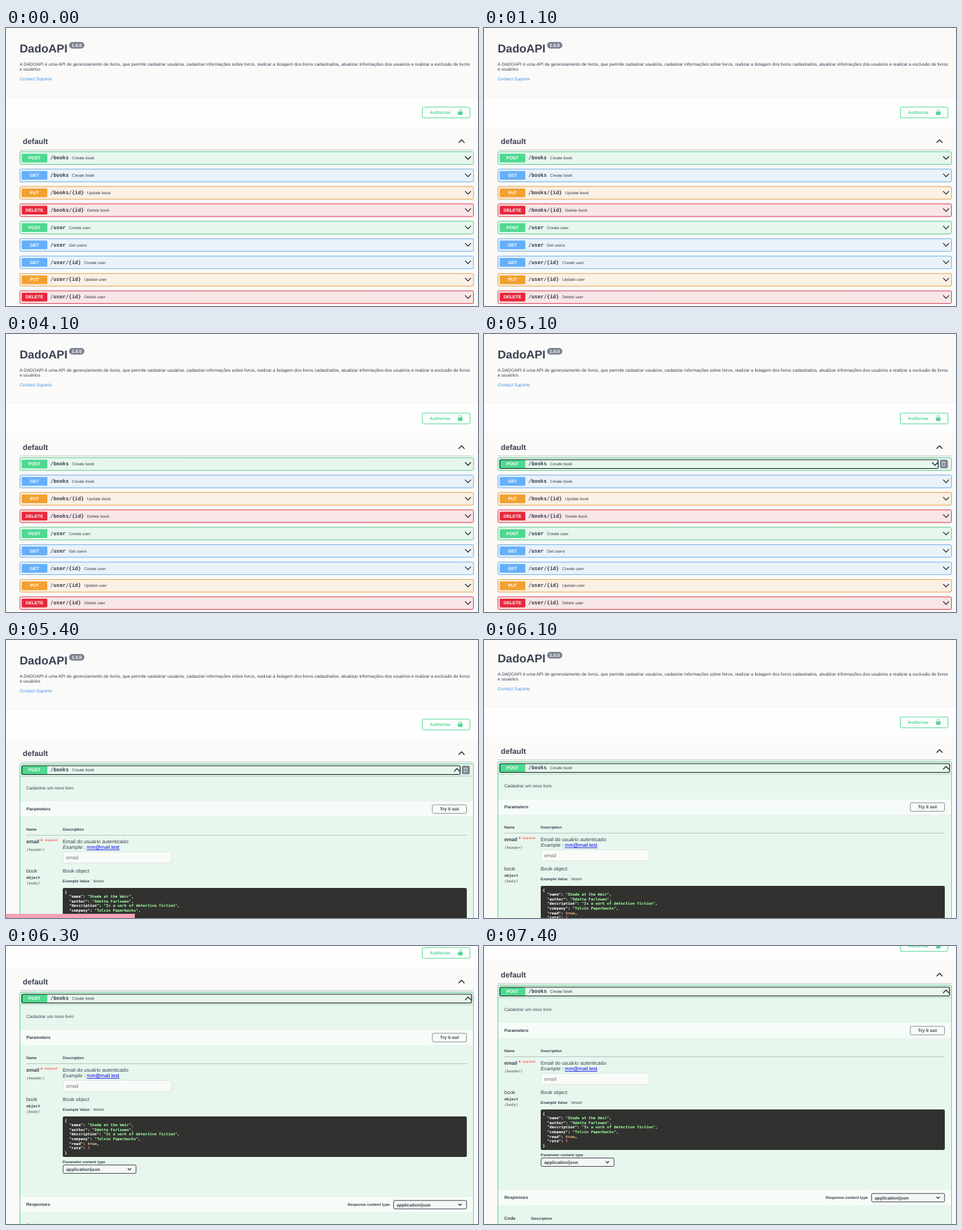
An HTML page that plays this animation: 674 px wide and 398 px high, repeating every 8 s.

```html
<!DOCTYPE html>
<html lang="pt">
<head>
<meta charset="utf-8">
<title>API docs</title>
<style>
  html, body { margin: 0; width: 100%; height: 100%; overflow: hidden; background: #fafaf9; }
  svg { display: block; }
  text { font-family: "Liberation Sans", Arial, sans-serif; fill: #3b4151; white-space: pre; text-rendering: geometricPrecision; }
  .b { font-weight: 700; }
  .i { font-style: italic; }
  .m { font-family: "DejaVu Sans Mono", monospace; font-weight: 700; }
  .block { filter: drop-shadow(0 0 .6px rgba(0, 0, 0, .3)); }
  .band { filter: drop-shadow(0 .5px .5px rgba(0, 0, 0, .14)); }
</style>
</head>
<body>
<svg id="stage" width="674" height="398" viewBox="0 0 674 398"></svg>
<script>
const SCALE = 0.4555;          // page zoom: CSS px to stage px
const LOOP = 8000, TICK = 100;
const INK = '#3b4151', GREEN = '#4fd990';
const METHODS = {
  POST: [GREEN, '#e7f7ed'],
  GET: ['#64affa', '#eaf2f9'],
  PUT: ['#f2a030', '#faf0e4'],
  DELETE: ['#e6283c', '#f8e6e6'],
};
const ROWS = [
  ['POST', '/books', 'Create book'],
  ['GET', '/books', 'Create book'],
  ['PUT', '/books/{id}', 'Update book'],
  ['DELETE', '/books/{id}', 'Delete book'],
  ['POST', '/user', 'Create user'],
  ['GET', '/user', 'Get users'],
  ['GET', '/user/{id}', 'Create user'],
  ['PUT', '/user/{id}', 'Update user'],
  ['DELETE', '/user/{id}', 'Delete user'],
];
const BOOK = [
  ['name', '"Shade at the Weir"'],
  ['author', '"Odetta Farlowen"'],
  ['description', '"Is a work of detective fiction"'],
  ['company', '"Tolvin Paperbacks"'],
  ['read', 'true'],
  ['rate', '5'],
];
// time in ms, scroll offset in stage px
const SCROLL = [[6000, 0], [6100, 3], [6200, 56], [6300, 111], [6400, 117], [6600, 120], [6800, 121]];

function add(parent, tag, attrs = {}, content) {
  const node = document.createElementNS('http://www.w3.org/2000/svg', tag);
  for (const key in attrs) node.setAttribute(key, attrs[key]);
  if (content) node.textContent = content;
  return parent.appendChild(node);
}
const group = (parent) => add(parent, 'g');
const rect = (parent, x, y, right, bottom, attrs) =>
  add(parent, 'rect', { x, y, width: right - x, height: bottom - y, ...attrs });
function text(parent, x, y, str, size, cls = '', fill = INK, anchor = 'start') {
  return add(parent, 'text', {
    x, y, class: cls, 'text-anchor': anchor,
    style: `font-size:${(size * SCALE).toFixed(3)}px;fill:${fill}`,
  }, str);
}
const rule = (parent, x, right, y, color) => rect(parent, x, y - .3, right, y + .3, { fill: color });
function chevron(parent, x, y, up, w = 3.9, h = 2) {
  const d = up ? -h : h;
  return add(parent, 'path', {
    d: `M${x - w} ${y - d}L${x} ${y + d}L${x + w} ${y - d}`,
    fill: 'none', stroke: '#1c1f26', 'stroke-width': 1.1, 'stroke-linecap': 'round', 'stroke-linejoin': 'round',
  });
}
function outlined(parent, x, y, right, bottom, stroke, fill = 'none', width = .9) {
  return rect(parent, x, y, right, bottom, { rx: 1.8, fill, stroke, 'stroke-width': width });
}
function select(parent, x, y) {
  outlined(parent, x + .5, y, x + 104.7, y + 12, '#41444e', '#f3f8f4').setAttribute('class', 'band');
  text(parent, x + 5, y + 8.2, 'application/json', 14, 'b');
  chevron(parent, x + 95.3, y + 6.1, false, 2, 1);
}
function band(parent, y, title) {
  rect(parent, 20.5, y, 667, y + 22.8, { fill: '#f6fcf8', class: 'band' });
  text(parent, 29, y + 13.4, title, 14, 'b');
}

function header(g) {
  text(g, 19.5, 35, 'DadoAPI', 36, 'b');
  rect(g, 90, 20, 112, 29.4, { rx: 4.7, fill: '#7d8492' });
  text(g, 101, 27, '1.0.0', 14.2, 'b', '#fff', 'middle');
  text(g, 19.5, 53.5, 'A DADOAPI é uma API de gerenciamento de livros, que permite cadastrar usuários, cadastrar informações sobre livros, realizar a listagem dos livros cadastrados, atualizar informações dos usuários e realizar a exclusão de livros', 14);
  text(g, 19.5, 60.8, 'e usuários', 14);
  text(g, 19.5, 75.3, 'Contact Suporte', 14, '', '#4990e2');

  rect(g, 0, 99.5, 674, 142, { fill: '#fefefe', class: 'band' });
  outlined(g, 594.5, 113.2, 662.5, 128.7, GREEN);
  text(g, 605.3, 122.8, 'Authorize', 14, 'b', GREEN);
  rect(g, 645.4, 119.5, 651.9, 124.6, { rx: .8, fill: GREEN });
  add(g, 'path', { d: 'M646.9 118.7V118.4Q646.9 116.8 648.7 116.8T650.4 118.4V120', fill: 'none', stroke: GREEN, 'stroke-width': .95 });

  text(g, 24, 166.3, 'default', 24, 'b');
  chevron(g, 650.5, 162, true);
  rule(g, 20, 668, 174.6, '#b3b6ba');
}

function row(g, [method, path, label], y, bottom = y + 18) {
  const [color, tint] = METHODS[method];
  outlined(g, 20, y, 667.5, bottom, color, tint, .8).setAttribute('class', 'block');
  rect(g, 22.4, y + 2.7, 59, y + 15.2, { rx: 1.4, fill: color });
  text(g, 40.6, y + 11, method, 14, 'b', '#fff', 'middle');
  text(g, 63.3, y + 11, path, 16, 'm');
  text(g, 67.8 + path.length * 4.388, y + 11, label, 13);
}

function codeBlock(g) {
  rect(g, 81, 355, 658, 413, { rx: 1.9, fill: '#31322f' });
  const line = (i, str) => text(g, 83.7, 362.6 + i * 6.59, str, 12, 'm', '#fff');
  line(0, '{');
  BOOK.forEach(([key, value], i) => {
    const node = line(i + 1, `  "${key}": `);
    const color = value[0] === '"' ? '#a2fca2' : value === 'true' ? '#fcc28c' : '#d36363';
    add(node, 'tspan', { style: `fill:${color}` }, value);
    if (i < BOOK.length - 1) add(node, 'tspan', {}, ',');
  });
  line(BOOK.length + 1, '}');
}

function details(g) {
  row(g, ROWS[0], 177.2, 640);
  rule(g, 20, 667.5, 194.9, '#7fb79b');
  text(g, 29, 213.8, 'Cadastrar um novo livro', 14);

  band(g, 230.4, 'Parameters');
  outlined(g, 608.8, 236, 657.6, 248.2, '#777b82', 'none', .8);
  text(g, 633.2, 244, 'Try it out', 14, 'b', INK, 'middle');

  text(g, 29, 273, 'Name', 12, 'b');
  text(g, 81, 273, 'Description', 12, 'b');
  rule(g, 29, 658, 279.3, '#9fabaa');

  text(g, 29, 291, 'email', 16, 'b');
  text(g, 49.6, 290.3, '*', 16, 'b', '#f22');
  text(g, 54.9, 288.2, 'required', 10, 'b', '#f66');
  text(g, 29, 301.8, '(header)', 12, 'm i', '#808080');
  text(g, 81, 291, 'Email do usuário autenticado', 16);
  const example = text(g, 81, 299, '', 16);
  add(example, 'tspan', { class: 'i' }, 'Example');
  add(example, 'tspan', {}, ' : ');
  add(example, 'tspan', { style: 'fill:#00e', 'text-decoration': 'underline' }, 'mm@mail.test');
  outlined(g, 81.3, 303.3, 236, 319.2, '#d5dbd6', '#f9fbf8', .7);
  text(g, 86, 313.7, 'email', 16, '', '#757575');

  text(g, 29, 333, 'book', 16);
  text(g, 29, 341.5, 'object', 12, 'm');
  text(g, 29, 350.3, '(body)', 12, 'm i', '#808080');
  text(g, 81, 333, 'Book object', 16);
  text(g, 81, 346.5, 'Example Value', 12, 'b');
  rect(g, 121.8, 341.5, 122.2, 347.5, { fill: '#b5bfba' });
  text(g, 124.8, 346.5, 'Model', 12);
  codeBlock(g);
  text(g, 81, 421.7, 'Parameter content type', 12, 'b');
  select(g, 81, 424.5);

  band(g, 469.8, 'Responses');
  text(g, 488, 483, 'Response content type', 12, 'b');
  select(g, 553, 475.3);
  text(g, 29, 513.2, 'Code', 14, 'b');
  text(g, 67.3, 512.7, 'Description', 12, 'b');
}

function copyButton(g) {
  rect(g, 651, 180, 662.3, 192.2, { rx: 1.8, fill: '#7d8492' });
  add(g, 'path', {
    d: 'M658.6 185V183.6H654.3V189H656M655.7 183.4H657.3M656.6 186.2H659.3M656.6 188.4H659.3',
    fill: 'none', stroke: '#fff', 'stroke-width': .7,
  });
}

const stage = document.getElementById('stage');
const page = group(stage);
header(page);
const list = group(page);
ROWS.forEach((r, i) => {
  const y = 177.2 + i * 24.89;
  row(list, r, y);
  if (i) chevron(list, 659.8, y + 8.8, false);
});
const opened = group(page);
details(opened);
const arrowDown = chevron(page, 0, 186, false);
const arrowUp = chevron(page, 0, 186, true);
const focusRing = outlined(page, 22.6, 180, 648.5, 192.5, '#1e2624', 'none', 1.2);
const copy = group(page);
copyButton(copy);
const statusBar = rect(stage, 0, 392, 184, 398, { fill: '#f3a3b5' });

function scrollAt(t) {
  const next = SCROLL.findIndex(([time]) => time > t);
  if (next === 0) return 0;
  if (next < 0) return SCROLL[SCROLL.length - 1][1];
  const [t0, y0] = SCROLL[next - 1], [t1, y1] = SCROLL[next];
  return y0 + (y1 - y0) * (t - t0) / (t1 - t0);
}
const show = (node, on) => node.setAttribute('visibility', on ? 'visible' : 'hidden');

function draw(now) {
  const t = Math.floor((now % LOOP) / TICK) * TICK;
  const focused = t >= 5100, isOpen = t >= 5200, hovered = focused && t < 6000;
  show(list, !isOpen);
  show(opened, isOpen);
  show(arrowDown, !isOpen);
  show(arrowUp, isOpen);
  show(focusRing, focused);
  show(copy, hovered);
  show(statusBar, t >= 5300 && t < 5900);
  const arrowX = hovered ? 644 : 659.8;
  arrowDown.setAttribute('transform', `translate(${arrowX})`);
  arrowUp.setAttribute('transform', `translate(${arrowX})`);
  focusRing.setAttribute('width', (hovered ? 648.5 : 664.8) - 22.6);
  page.setAttribute('transform', `translate(0 ${-scrollAt(t)})`);
}

const start = performance.now();
function tick() {
  draw(performance.now() - start);
  requestAnimationFrame(tick);
}
tick();
</script>
</body>
</html>
```
